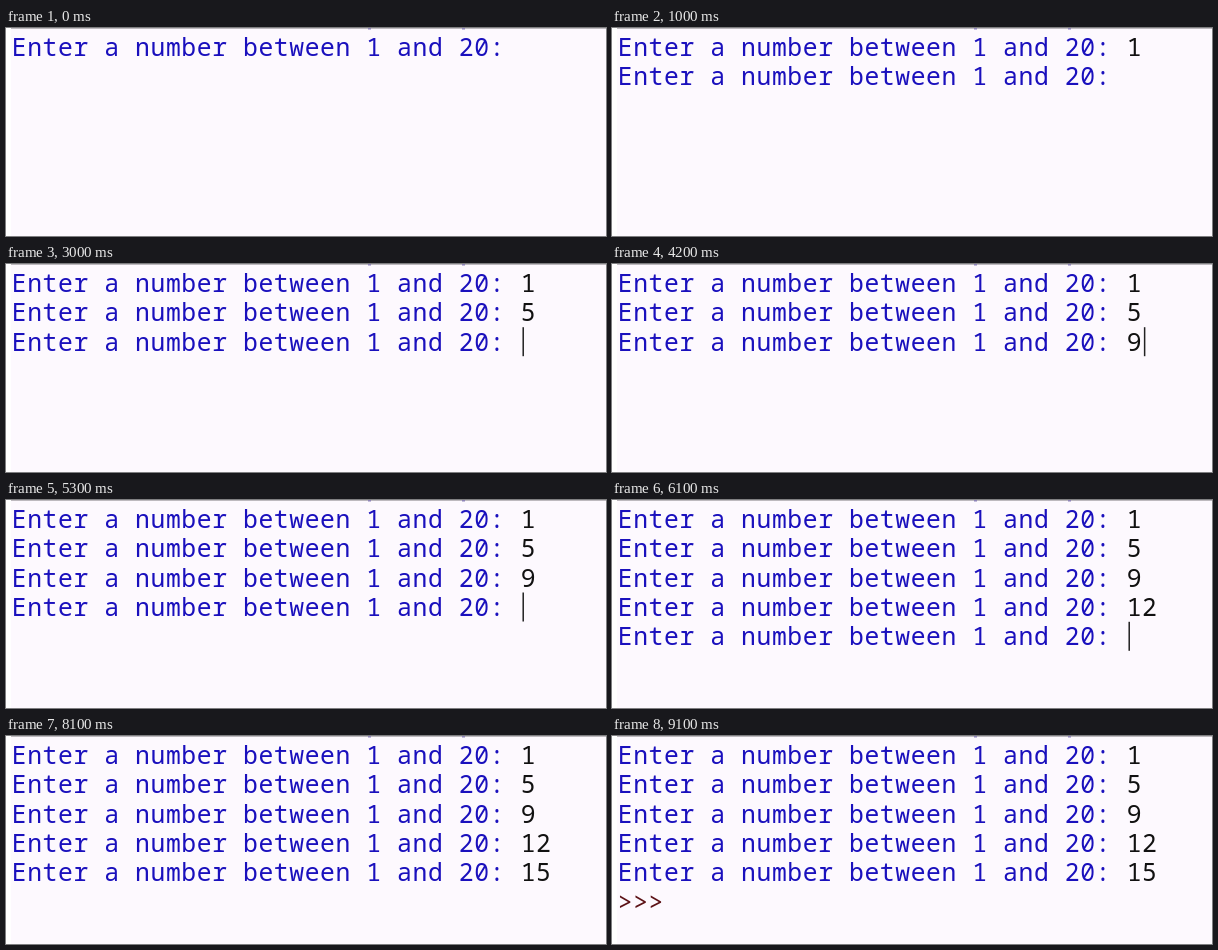
Write an HTML page that moves like this. It is 600 by 208 pixels and loops after 9200 ms.

```html
<!DOCTYPE html>
<html lang="en">
<head>
<meta charset="utf-8">
<title>Number prompt</title>
<style>
html, body { margin: 0; width: 100%; height: 100%; overflow: hidden; background: #fdf9fe; }
svg { display: block; width: 600px; height: 208px; }
text {
  font: 500 24.7px "Noto Sans Mono", "DejaVu Sans Mono", monospace;
  letter-spacing: .6px;
  white-space: pre;
  fill: #1a10bd;
}
.answer { fill: #111; }
.shell { fill: #5c1216; }
</style>
</head>
<body>
<svg viewBox="0 0 600 208">
  <path d="M0 0h5v208h-5z" fill="#fff"/>
  <path d="M5 0h595v1h-595z" fill="#bdb9be"/>
  <path d="M362 0h3v1.5h-3zM456 0h3v1.5h-3z" fill="#8d83b8"/>
  <g id="lines"></g>
  <rect id="caret" width="1.5" height="29" fill="#222"/>
</svg>
<script>
const LOOP = 9200, LEFT = 5.8, ADVANCE = 15.42, BASE = 28, PITCH = 29.3;
const PROMPT = "Enter a number between 1 and 20: ";

// Time each prompt appears, its answer, and the time of each key
const rows = [
  { at: 0, answer: "1", keys: [400] },
  { at: 1000, answer: "5", keys: [2100] },
  { at: 2800, answer: "9", keys: [3800] },
  { at: 4700, answer: "12", keys: [5400, 5600] },
  { at: 5900, answer: "15", keys: [6800, 7000] },
  { at: 8500, prompt: ">>> ", answer: "", keys: [] }
];

const lines = document.getElementById("lines");
const caret = document.getElementById("caret");

function addText(row, col, text, name) {
  const el = document.createElementNS(lines.namespaceURI, "text");
  el.setAttribute("x", LEFT + col * ADVANCE);
  el.setAttribute("y", BASE + row * PITCH);
  el.setAttribute("class", name);
  el.textContent = text;
  lines.append(el);
  return el;
}

rows.forEach((row, i) => {
  row.prompt ??= PROMPT;
  row.label = addText(i, 0, row.prompt, row.prompt === PROMPT ? "prompt" : "shell");
  row.entry = addText(i, row.prompt.length, "", "answer");
});

// The caret is lit for 600 ms and dark for 300 ms
function caretLit(t) {
  const start = t < 6300 ? 300 : t < 8500 ? 6400 : 8500;
  return (t - start + 900) % 900 < 600;
}

function draw() {
  const t = Math.floor(performance.now() % LOOP / 100) * 100;
  rows.forEach((row, i) => {
    const shown = t >= row.at;
    const typed = row.keys.filter(k => t >= k).length;
    row.label.style.display = shown ? "" : "none";
    row.entry.textContent = row.answer.slice(0, typed);
    if (shown) {
      caret.setAttribute("x", LEFT + (row.prompt.length + typed) * ADVANCE + 1.8);
      caret.setAttribute("y", 4.6 + i * PITCH);
    }
  });
  caret.style.display = caretLit(t) ? "" : "none";
  requestAnimationFrame(draw);
}
draw();
</script>
</body>
</html>
```
